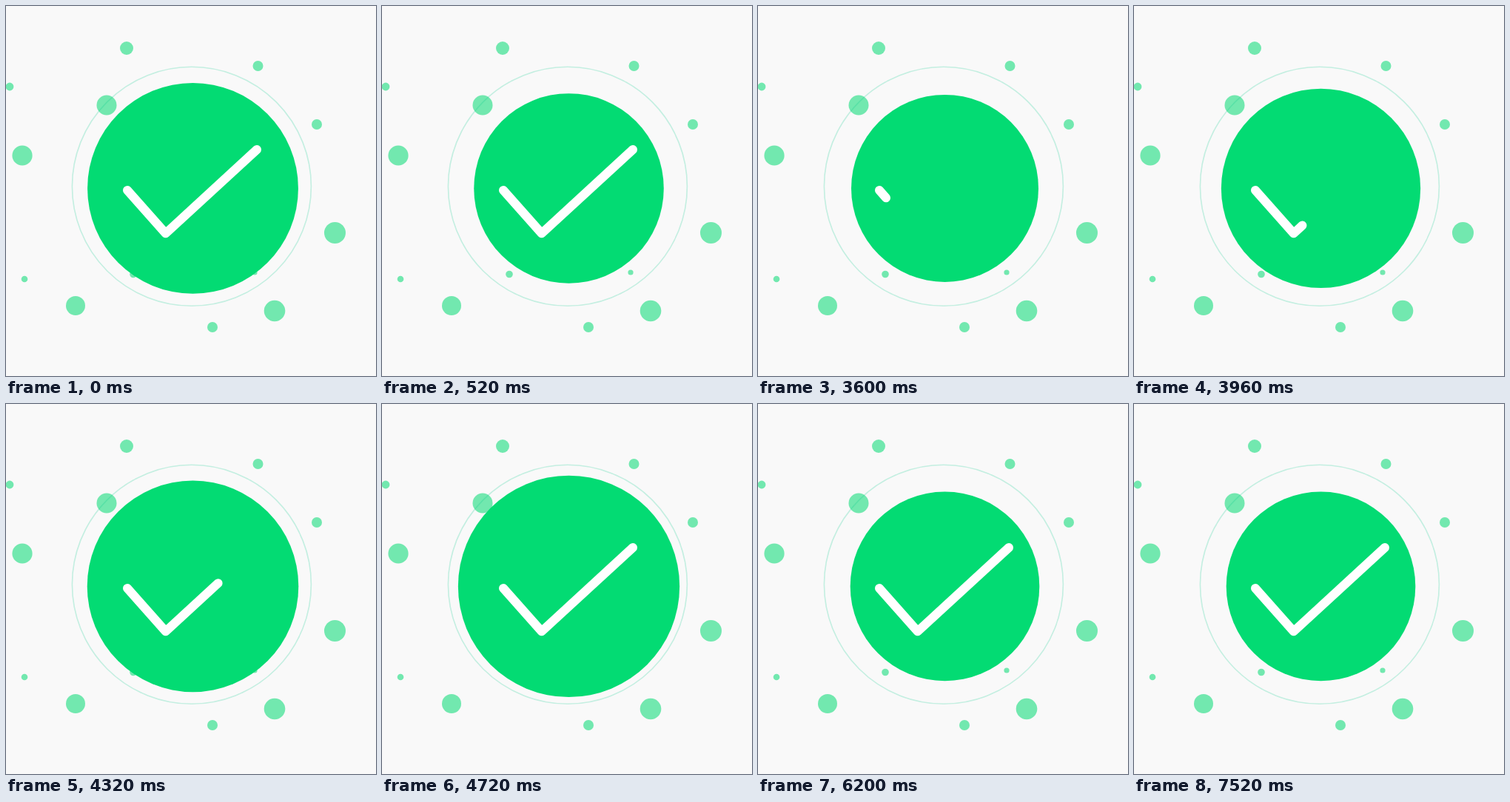
Animation of 500 by 500 pixels, one loop 7.6 s. Source, as an HTML page:

```html
<!DOCTYPE html>
<html>
<head>
<meta charset="utf-8">
<style>
  html, body { margin: 0; height: 100%; overflow: hidden; background: #f9f9f9; }
  svg { display: block; width: 100%; height: 100%; }
</style>
</head>
<body>
<svg viewBox="0 0 500 500">
  <g id="dots" fill="#03db73" fill-opacity=".55"></g>
  <circle cx="250.9" cy="243.8" r="161.5" fill="none" stroke="#03c98a" stroke-opacity=".22" stroke-width="1.6"/>
  <circle id="disc" cx="252.5" cy="246.4" fill="#03db73"/>
  <path id="check" d="M164 249L215.7 307.3L339 194" fill="none" stroke="#fff" stroke-width="12"
    stroke-linecap="round" stroke-linejoin="round"/>
</svg>
<script>
const LOOP = 7600;
const RESTART = 3540;   // tick is wiped and drawn again
const GROW = 1100, SHRINK = 1020;
const OFFSET = 1504;    // the loop opens this far into a pulse
const SMALL = 125.1, BIG = 150, REST = 127.8;

const disc = document.getElementById('disc');
const check = document.getElementById('check');
const length = check.getTotalLength();

document.getElementById('dots').innerHTML = [
  [163, 57, 9], [340.5, 81, 7], [5, 109, 5.4], [136, 134, 13.5], [420, 160, 7],
  [22, 202, 13.6], [444.5, 306.5, 14.5], [25, 369, 4.3], [94, 405, 13],
  [363, 412, 14.3], [279, 434, 7], [172, 362.5, 4.8], [336, 360, 3.6]
].map(([x, y, r]) => `<circle cx="${x}" cy="${y}" r="${r}"/>`).join('');

const clamp = v => Math.min(1, Math.max(0, v));
const ease = v => (1 - Math.cos(Math.PI * v)) / 2;

function draw(now) {
  const t = now % LOOP;
  const pulse = t < RESTART ? t + OFFSET : t - RESTART;
  const grow = clamp(pulse / GROW);
  const shrink = ease(clamp((pulse - GROW) / SHRINK));
  disc.setAttribute('r', SMALL + (BIG - SMALL) * grow + (REST - BIG) * shrink);
  check.setAttribute('stroke-dasharray', grow < 1 ? `${length * grow} ${length * 2}` : 'none');
  requestAnimationFrame(() => draw(performance.now() - start));
}

const start = performance.now();
draw(0);
</script>
</body>
</html>
```
